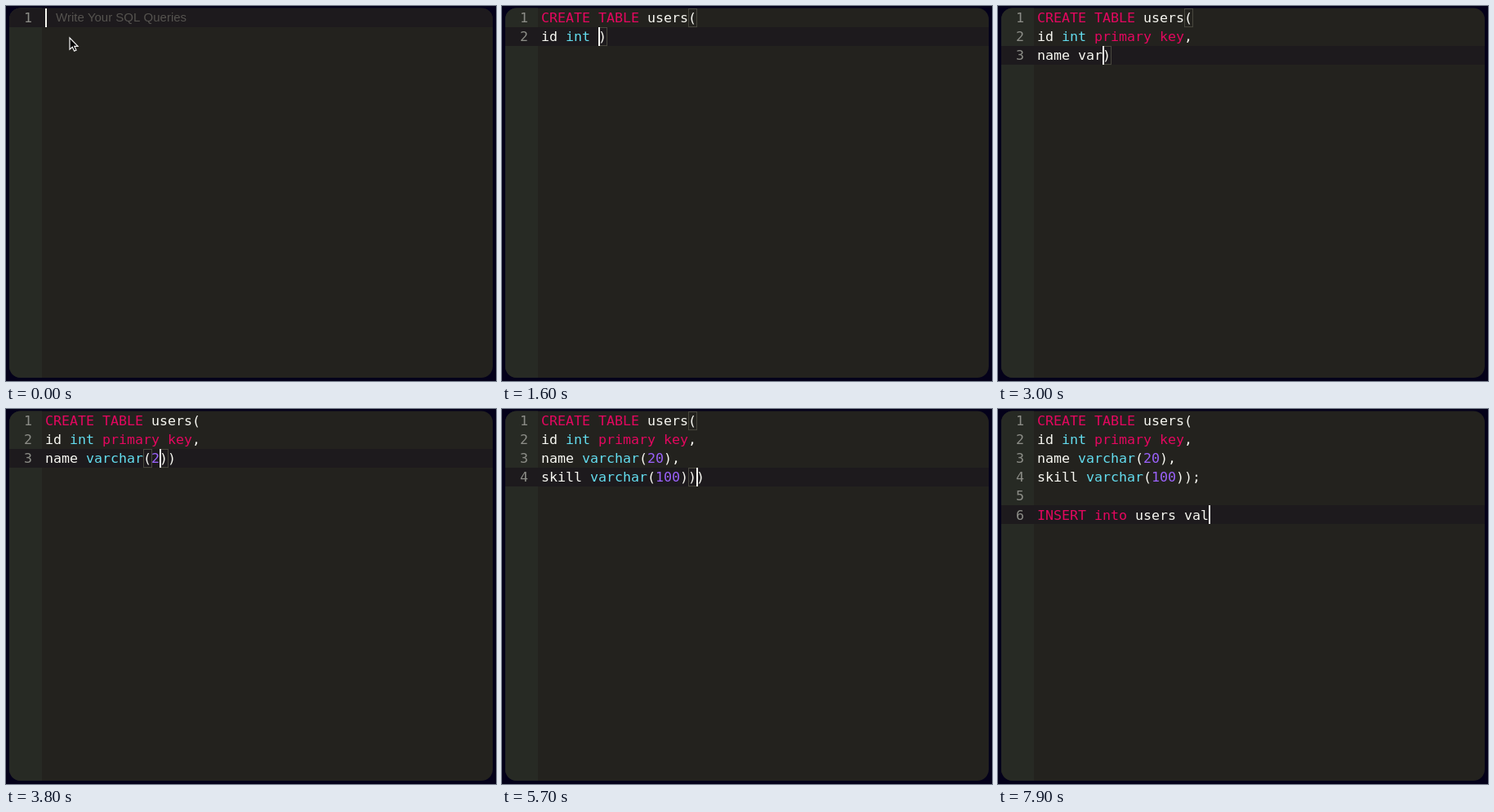
An HTML page with a canvas that plays this animation: 600 px wide and 460 px high, repeating every 8 s.

```html
<!DOCTYPE html>
<html lang="en">
<head>
<meta charset="utf-8">
<title>SQL editor</title>
<style>
html, body { margin: 0; width: 100%; height: 100%; overflow: hidden; background: #04011a; }
canvas { display: block; }
</style>
</head>
<body>
<canvas id="stage" width="600" height="460"></canvas>
<script>
const ctx = document.getElementById('stage').getContext('2d');
const TICK = 100, TICKS = 80;
const LEFT = 48, TOP = 2.7, COL = 10, ROW = 23.1;
const MONO = '16.61px "DejaVu Sans Mono", monospace';
const COLORS = {
  page: '#04011a', panel: '#23221e', gutter: '#272a24', active: '#1d1a1d',
  number: '#8c8d87', hint: '#55534f', plain: '#f8f8f2', keyword: '#e4075f',
  type: '#63dcee', digit: '#9b62fb', match: '#49483e'
};

// "<" is the forward delete key.
const KEYS = 'CREATE TABLE users(\n' +
  'id int primary key,\n' +
  'name varchar(20),\n' +
  'skill varchar(100))<;\n\n' +
  'INSERT into users val';

// [tick, keys pressed so far]
const PACE = [
  [0, 0], [9, 18], [11, 20], [16, 27], [24, 38], [25, 40], [30, 48], [36, 53],
  [45, 61], [46, 63], [57, 77], [60, 79], [63, 81], [68, 88], [72, 98], [79, 102]
];

function keysAt(tick) {
  const i = PACE.findIndex(p => p[0] >= tick);
  if (i <= 0) return 0;
  const [t0, n0] = PACE[i - 1], [t1, n1] = PACE[i];
  return Math.floor(n0 + (n1 - n0) * (tick - t0) / (t1 - t0) + 1e-6);
}

// Opening brackets close themselves; the newest closing one may be typed over.
function typeKeys(count) {
  let before = '', after = '', open = false;
  for (const key of KEYS.slice(0, count)) {
    if (key === '<') {
      after = after.slice(1);
    } else if (key === ')' && open) {
      before += key;
      after = after.slice(1);
      open = false;
    } else {
      before += key;
      if (key === '(') {
        after = ')' + after;
        open = true;
      }
    }
  }
  return { text: before + after, caret: before.length };
}

function findMatch(text, at) {
  const step = text[at] === '(' ? 1 : text[at] === ')' ? -1 : 0;
  if (!step) return -1;
  let depth = 0;
  for (let i = at; i >= 0 && i < text.length; i += step) {
    if (text[i] === '(') depth++;
    if (text[i] === ')') depth--;
    if (depth === 0) return i;
  }
  return -1;
}

function place(text, index) {
  const lines = text.slice(0, index).split('\n');
  return { row: lines.length - 1, col: lines[lines.length - 1].length };
}

const rowTop = row => Math.round(TOP + row * ROW);
const baseline = row => TOP + row * ROW + 17.3;

function tokenColor(word) {
  if (/^\d+$/.test(word)) return COLORS.digit;
  if (/^(int|varchar)$/i.test(word)) return COLORS.type;
  if (/^(create|table|primary|key|insert|into)$/i.test(word)) return COLORS.keyword;
  return COLORS.plain;
}

function drawLine(line, row) {
  ctx.font = MONO;
  ctx.fillStyle = COLORS.number;
  ctx.fillText(row + 1, 22, baseline(row));
  for (const m of line.matchAll(/\w+|[^\w\s]+/g)) {
    ctx.fillStyle = tokenColor(m[0]);
    ctx.fillText(m[0], LEFT + m.index * COL, baseline(row));
  }
}

function drawMatch(text, caret) {
  for (const at of [caret - 1, caret]) {
    const other = findMatch(text, at);
    if (other < 0) continue;
    ctx.strokeStyle = COLORS.match;
    ctx.lineWidth = 1;
    for (const index of [at, other]) {
      const p = place(text, index);
      ctx.strokeRect(LEFT + p.col * COL + 0.5, rowTop(p.row) + 0.5, COL, ROW - 1);
    }
    return;
  }
}

function drawPointer() {
  const shape = new Path2D('M78 39 V53.2 L81.3 50.2 L83.6 55.2 L86 54.1 L83.8 49.3 H88 Z');
  ctx.fillStyle = '#000';
  ctx.fill(shape);
  ctx.strokeStyle = '#f4f4f4';
  ctx.lineWidth = 1.2;
  ctx.stroke(shape);
}

function drawPanel(activeRow) {
  ctx.fillStyle = COLORS.page;
  ctx.fillRect(0, 0, 600, 460);
  ctx.save();
  ctx.beginPath();
  ctx.roundRect(4, 2.5, 592, 453.5, 14);
  ctx.clip();
  ctx.fillStyle = COLORS.panel;
  ctx.fillRect(0, 0, 600, 460);
  ctx.fillStyle = COLORS.gutter;
  ctx.fillRect(0, 0, 44, 460);
  ctx.fillStyle = COLORS.active;
  const top = rowTop(activeRow);
  ctx.fillRect(0, top, 600, rowTop(activeRow + 1) - top);
  ctx.restore();
}

function draw(tick) {
  const { text, caret } = typeKeys(keysAt(tick));
  const pos = place(text, caret);
  drawPanel(pos.row);
  drawMatch(text, caret);
  text.split('\n').forEach(drawLine);
  if (!text) {
    ctx.font = '15px "Liberation Sans", Arial, sans-serif';
    ctx.fillStyle = COLORS.hint;
    ctx.fillText('Write Your SQL Queries', 61, 19);
    drawPointer();
  }
  ctx.fillStyle = COLORS.plain;
  ctx.fillRect(LEFT + pos.col * COL, rowTop(pos.row), 2, 23);
}

const start = performance.now();
function frame() {
  draw(Math.floor((performance.now() - start) / TICK) % TICKS);
  requestAnimationFrame(frame);
}
frame();
</script>
</body>
</html>
```
